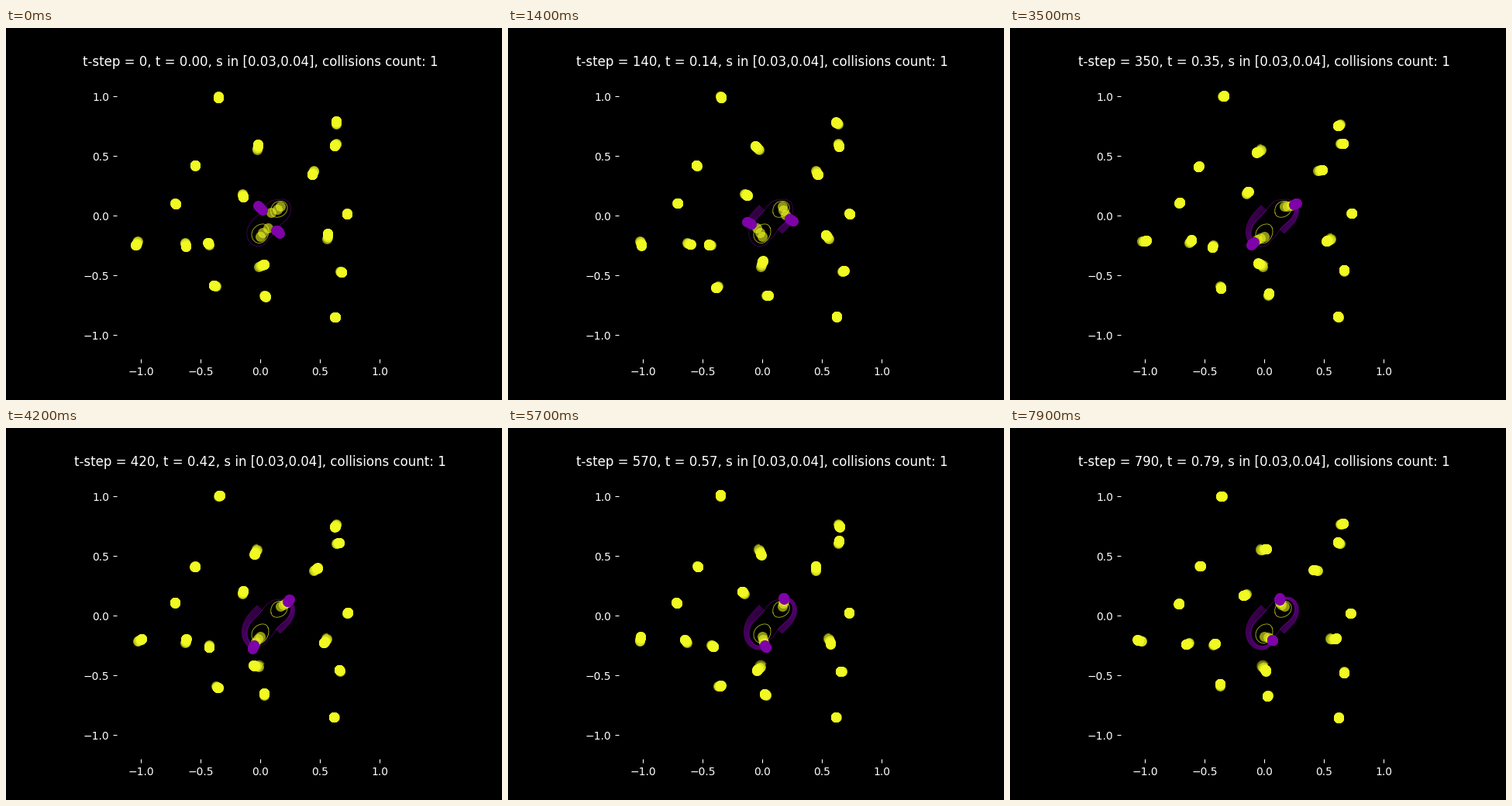
A matplotlib script that plays this animation: 640 px wide and 480 px high, repeating every 8000 ms.

```python
import numpy as np
import matplotlib.pyplot as plt
from matplotlib.animation import FuncAnimation
from matplotlib.collections import LineCollection

STEPS = 80
YELLOW, PURPLE = "#f0f921", "#7e03a8"
FAINT_S = np.array([0, 0.01, 0.02])
SOLID_S = np.linspace(0.03, 0.04, 6)
S_MAX = SOLID_S[-1]

# pivot x, pivot y, arm length, arm angle at the start (stage pixels, degrees)
BODIES = np.array([
    (275, 88, 2, 250), (427, 124, 4, 90), (325, 157, 7, 85),
    (245, 178, 1.5, 90), (427, 149, 4, 228), (398, 184, 6, 245),
    (219, 226, 1, 300), (441, 239, 1, 256), (171, 275, 6, 240),
    (232, 277, 5, 283), (415, 272, 7, 80), (432, 314, 2.5, 330),
    (272, 333, 3.5, 165), (334, 344.5, 2.5, 305), (424.5, 373, 1, 0),
    (305.5, 214, 4.5, 285), (263, 280, 3.5, 120), (327, 307.5, 7.5, 20),
])

# the close pair: centre, half separation, response to the turning push
CENTRE, HALF = 342 - 249.5j, 12.8 + 19.2j
PUSH, BEND, DRIFT = 322 - 710j, -222 - 150j, -1.9 + 2.3j


def to_xy(z):
    """Complex stage pixels to axes units, last axis (x, y)."""
    return np.stack([z.real - 328.8, z.imag + 242.4], -1) / 154


def singles(s, turn):
    """Points of the free bodies, indexed [s, step, body]."""
    x, y, arm, start = BODIES.T
    reach = arm * np.exp(1j * np.radians(start)) * turn[:, None]
    return to_xy(x - 1j * y + reach * (s / S_MAX)[:, None, None])


def pair(s, turn):
    """Two roots of (z - CENTRE)^2 = HALF^2 + push, indexed [s, step, root]."""
    v = np.outer(s / 0.035, turn)
    q = HALF**2 + PUSH * v + BEND * v**2
    root = np.sqrt(abs(q)) * np.exp(0.5j * np.unwrap(np.angle(q), axis=1))
    mid = CENTRE + DRIFT * v
    return to_xy(np.stack([mid + root, mid - root], -1))


turn = np.exp(2j * np.pi * np.arange(STEPS) / 100)
faint_pts = np.concatenate([singles(FAINT_S, turn), pair(FAINT_S, turn)], axis=2)
solid_pts, hit_pts = singles(SOLID_S, turn), pair(SOLID_S, turn)

plt.style.use("dark_background")
fig, ax = plt.subplots(figsize=(6.4, 4.8), dpi=100)
ax.set_aspect("equal")
ax.set(xlim=(-1.2, 1.2), ylim=(-1.2, 1.2))
ticks = np.arange(-1, 1.1, 0.5)
ax.set_xticks(ticks)
ax.set_yticks(ticks)
for spine in ax.spines.values():
    spine.set_visible(False)
title = ax.set_title("")

# full-turn outlines of the pair at two strengths
full_turn = np.exp(2j * np.pi * np.linspace(0, 1, 401))
for s, color, alpha in ((0.02, YELLOW, 0.75), (0.03, PURPLE, 0.55)):
    loops = pair(np.array([s]), full_turn)[0]
    for k in range(2):
        ax.plot(*loops[:, k].T, color=color, lw=0.6, alpha=alpha, zorder=2)


def dots(pts, color, alpha, z):
    artist, = ax.plot([], [], "o", ms=9.4, mew=0, color=color, alpha=alpha, zorder=z)
    return artist, pts


def trail(pts, color, alpha):
    lines = LineCollection([], colors=color, linewidths=1, alpha=alpha, zorder=1)
    ax.add_collection(lines, autolim=False)
    return lines, pts


beads = [dots(faint_pts, YELLOW, 0.6, 3), dots(solid_pts, YELLOW, 1, 4),
         dots(hit_pts, PURPLE, 1, 5)]
trails = [trail(solid_pts, YELLOW, 0.17), trail(hit_pts, PURPLE, 0.5)]


def draw(n):
    title.set_text(f"t-step = {10 * n}, t = {n / 100:.2f}, "
                   "s in [0.03,0.04], collisions count: 1")
    for artist, pts in beads:
        artist.set_data(*pts[:, n].reshape(-1, 2).T)
    for lines, pts in trails:
        past = pts[:, :n + 1].swapaxes(1, 2)
        lines.set_segments(list(past.reshape(-1, n + 1, 2)))


anim = FuncAnimation(fig, draw, frames=STEPS, interval=100, repeat=True, repeat_delay=0)
plt.show()
```
